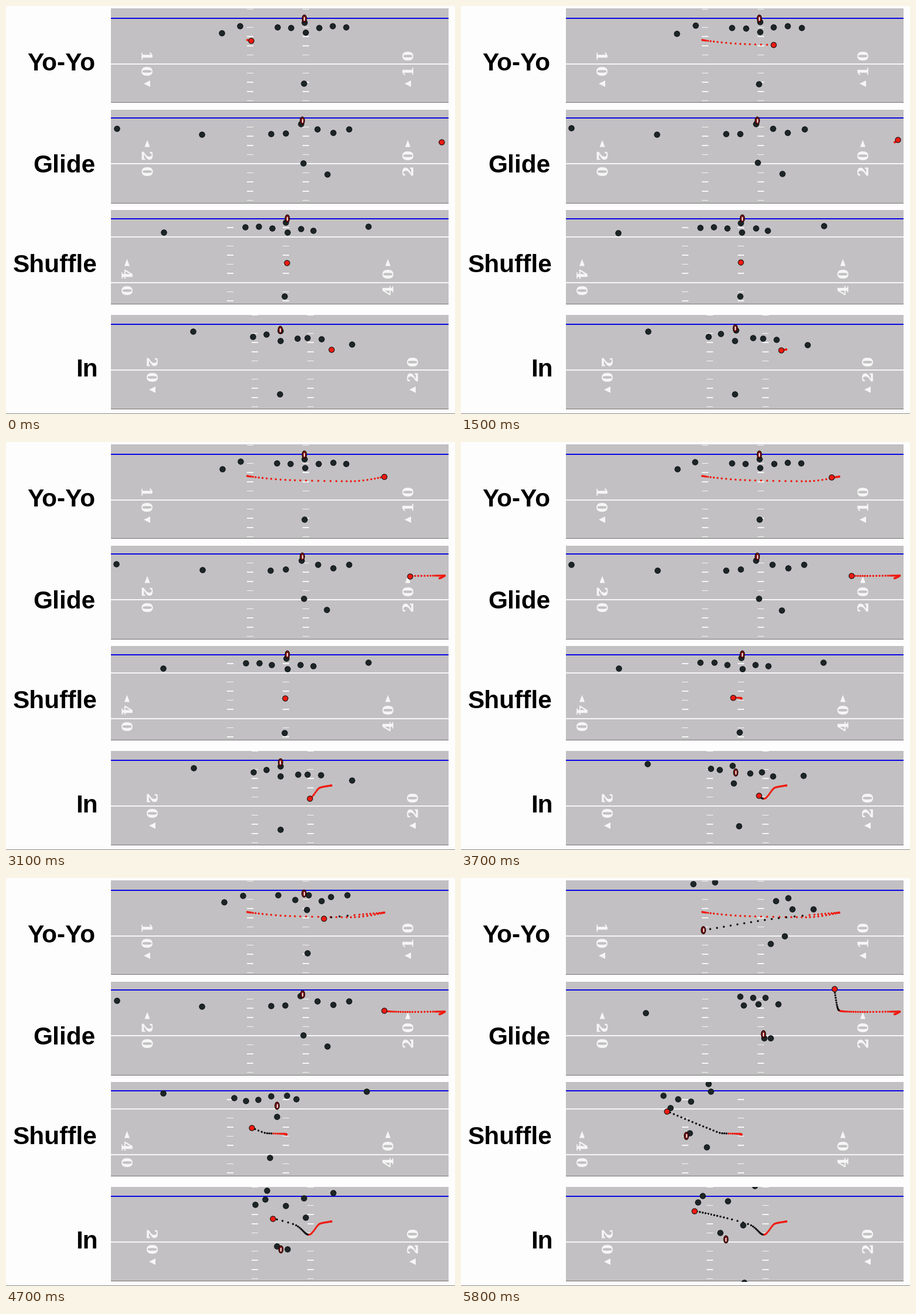
A matplotlib script for the animation above (5.9 s loop, 766 by 696 pixels).

```python
import numpy as np
import matplotlib.pyplot as plt
from matplotlib.animation import FuncAnimation
from matplotlib.patches import Ellipse, PathPatch, Polygon, Rectangle
from matplotlib.textpath import TextPath
from matplotlib.transforms import Affine2D

W, H, DPI = 766, 696, 100
FRAMES, STEP = 59, 100
PRE = 4                      # frames of motion before the loop begins
PX = 72 / DPI                # points per pixel
LEFT, SPAN, DEPTH = 178.5, 576, 160.5
YARD = 15.6
TURF, CHALK, BLUE = "#c2c0c2", "#f6f6f6", "#0c08e6"
DARK, RED, BALL = "#1d2527", "#f01a10", "#7c1717"

T = np.arange(-PRE, FRAMES)
rng = np.random.default_rng(7)


def ease_path(knots):
    """Monotone cubic curve through (time, x, y) knots, sampled at T."""
    knots = np.array(knots, float)
    k, p = knots[:, 0], knots[:, 1:]
    h = np.diff(k)[:, None]
    s = np.diff(p, axis=0) / h
    prod = s[:-1] * s[1:]
    total = np.where(prod > 0, s[:-1] + s[1:], 1)
    m = np.vstack([s[:1], np.where(prod > 0, 2 * prod / total, 0), s[-1:]])
    t = np.clip(T, k[0], k[-1])
    i = np.clip(np.searchsorted(k, t, "right") - 1, 0, len(k) - 2)
    d = h[i]
    u = (t - k[i])[:, None] / d
    return ((1 + 2 * u) * (1 - u) ** 2 * p[i] + u * (1 - u) ** 2 * d * m[i]
            + u * u * (3 - 2 * u) * p[i + 1] + u * u * (u - 1) * d * m[i + 1])


def route(pts, snap):
    """Stand with a slight sway, then run a Bezier route from the snap on."""
    w = np.clip((T - snap) / (FRAMES - 1 - snap), 0, 1)[:, None] ** 1.3
    p = np.reshape(np.array(pts, float), (-1, 1, 2))
    while len(p) > 1:
        p = p[:-1] + (p[1:] - p[:-1]) * w
    sway = 0.6 * np.sin(T[:, None] / 7 + rng.uniform(0, 2 * np.pi, 2))
    return p[0] + sway * (1 - w)


# routes: start, optional control point, end; motion and ball: time, x, y
PLAYS = [
    dict(
        name="Yo-Yo", label=(94.3, 110), top=3.5, blue=20.5, lines=[98.5],
        hashes=(410, 505), number="10", num_x=(240, 685), num_y=(85, 111),
        arrow=("left", 132), snap=44,
        team=[
            (368, 46, 395, 9.5), (399, 33, 432, 6), (461.5, 36, 470, -15),
            (485, 37, 536, 38), (509, 27.5, 557.5, 33.5),
            (509.5, 43.5, 527.5, 111), (533, 36, 564, 52),
            (556.5, 34, 540, 22, 600, 52), (580, 36, 590, -20),
            (508, 132, 551, 98),
        ],
        motion=[(-4, 411, 57.5), (0, 417.5, 58.5), (10, 484, 64.5),
                (21, 588, 66.5), (32, 645, 58.5), (42, 602.5, 62),
                (47, 541.5, 68), (58, 413, 88.5)],
        ball=[(44, 508.5, 21), (47, 508, 26), (51, 499, 74), (58, 413, 88.5)],
    ),
    dict(
        name="Glide", label=(98.7, 283), top=176, blue=190.5, lines=[268.5],
        hashes=(410, 505), number="20", num_x=(240.5, 685), num_y=(255, 282),
        arrow=("up", 234), snap=47,
        team=[
            (187.5, 208, 190, 165), (334, 218.5, 314, 229),
            (451.5, 218, 475, 201), (476, 217, 481, 216),
            (502.5, 201, 497, 203), (506.5, 266.5, 516, 272),
            (547, 286, 527.5, 272), (531, 208.5, 506, 214),
            (557, 215, 518, 203), (585, 209, 540, 214),
        ],
        motion=[(-4, 739, 232), (0, 742, 231), (10, 748, 227.5),
                (21, 734, 227.5), (31, 688.5, 228), (42, 651, 227),
                (47, 644, 225), (58, 636, 188)],
        ball=[(45, 505, 195), (47, 505.5, 198), (51, 511, 262),
              (58, 515.5, 266)],
    ),
    dict(
        name="Shuffle", label=(82.7, 454), top=347.5, blue=362,
        lines=[393.5, 471], hashes=(376, 471), number="40",
        num_x=(206, 651), num_y=(457, 485), arrow=("up", 437), snap=40,
        team=[
            (268, 386, 264, 320), (407.5, 376.5, 344, 370),
            (431, 376, 356, 391), (453.5, 379, 369, 376),
            (477, 368.5, 391, 380), (479, 386, 418, 458),
            (502, 379, 421, 350), (523, 382, 425, 363.5),
            (618, 375, 608, 334), (475, 494.5, 389, 434.5),
        ],
        motion=[(0, 478, 437), (31, 475, 436), (42, 445, 435),
                (47, 418.5, 425.5), (58, 350, 397)],
        ball=[(40, 479.5, 362), (42, 479, 363), (47, 462, 388),
              (53, 430, 450), (58, 384, 439.5)],
    ),
    dict(
        name="In", label=(137.3, 632), top=526.5, blue=542.5, lines=[620],
        hashes=(418, 513), number="20", num_x=(249, 693), num_y=(607, 633),
        arrow=("left", 654), snap=33,
        team=[
            (319, 555, 300, 480), (421, 563, 472, 498), (443.5, 559, 403, 552),
            (467, 570, 450, 632, 482, 689.5), (468, 552.5, 411, 541.5),
            (497, 566, 454, 550), (514, 566, 500, 524),
            (537, 568, 480.5, 591), (590, 577, 520, 490),
            (467, 661, 504, 628, 441, 604),
        ],
        motion=[(10, 554, 585.5), (21, 535.5, 589), (32, 516, 608),
                (42, 494.5, 592), (47, 454, 580), (58, 397, 567)],
        ball=[(10, 467.5, 552), (21, 467.5, 547), (33, 468, 546),
              (47, 468.5, 633), (58, 451.5, 616)],
    ),
]

# whole coordinates are pixel centres
fig = plt.figure(figsize=(W / DPI, H / DPI), dpi=DPI, facecolor="#fdfdfd")
ax = fig.add_axes([0, 0, 1, 1])
ax.set_xlim(-0.5, W - 0.5)
ax.set_ylim(H - 0.5, -0.5)
ax.axis("off")


def box(x, y, w, h, color, z, clip=None):
    r = ax.add_patch(Rectangle((x, y), w, h, fc=color, lw=0, zorder=z))
    if clip is not None:
        r.set_clip_path(clip)
    return r


def digit(ch, x, y, angle):
    path = TextPath((0, 0), ch, size=24.5,
                    prop=dict(family="DejaVu Serif", weight="bold"))
    ext = path.get_extents()
    move = (Affine2D().translate(-(ext.x0 + ext.x1) / 2, -(ext.y0 + ext.y1) / 2)
            .scale(1, -1).rotate_deg(angle).translate(x, y))
    ax.add_patch(PathPatch(move.transform_path(path), fc=CHALK, ec=CHALK,
                           lw=0.5 * PX, zorder=3))


def arrow(kind, x, y):
    if kind == "up":
        pts = [(x, y - 6), (x - 4.5, y + 6), (x + 4.5, y + 6)]
    else:
        pts = [(x - 5.5, y), (x + 5.5, y - 5.5), (x + 5.5, y + 5.5)]
    ax.add_patch(Polygon(pts, fc=CHALK, lw=0, zorder=3))


def dots(size, color, z, clip, edge="none", lw=0):
    d = ax.scatter([], [], s=(size * PX) ** 2, c=color, zorder=z,
                   edgecolors=edge, linewidths=lw * PX)
    d.set_clip_path(clip)
    return d


class Play:
    def __init__(self, spec):
        self.snap = spec["snap"]
        self.draw_field(spec)
        self.team = np.stack([route(r, self.snap) for r in spec["team"]], 1)
        self.motion = ease_path(spec["motion"])
        self.ball = ease_path(spec["ball"])
        self.red_trail = dots(3.4, RED, 5, self.turf)
        self.black_trail = dots(3.4, "#0c0c0c", 6, self.turf)
        self.players = dots(9.4, DARK, 7, self.turf, "#0b1012", 1)
        self.mover = dots(9.2, RED, 8, self.turf, "#1a1010", 1.1)
        self.skin = ax.add_patch(Ellipse((0, 0), 7.6, 12.6, fc=BALL,
                                         ec="#1c0606", lw=1.2 * PX, zorder=9))
        self.lace, = ax.plot([], [], color="white", lw=1.7 * PX, zorder=10,
                             solid_capstyle="butt")

    def draw_field(self, s):
        top = s["top"]
        self.turf = box(LEFT, top, SPAN, DEPTH, TURF, 1)
        box(LEFT, top + DEPTH - 1, SPAN, 1, "#767476", 4)
        for k in range(-1, 10):
            y = s["blue"] + YARD * k
            if k and all(abs(y - line) > 5 for line in s["lines"]):
                for x in s["hashes"]:
                    box(x, y - 0.8, 11.5, 1.6, CHALK, 2, self.turf)
        for y in s["lines"]:
            box(LEFT, y - 1, SPAN, 2, CHALK, 2)
        box(LEFT, s["blue"] - 1, SPAN, 2, BLUE, 4)
        kind, ay = s["arrow"]
        for x, angle, order in zip(s["num_x"], (90, -90), (1, -1)):
            for ch, y in zip(s["number"][::order], s["num_y"]):
                digit(ch, x, y, angle)
            arrow(kind, x, ay)
        ax.text(*s["label"], s["name"], family="Liberation Sans", ha="center",
                weight="bold", size=42.4 * PX, color="black", va="baseline")

    def update(self, f):
        i, s = f + PRE, self.snap + PRE
        x, y = self.ball[i]
        self.players.set_offsets(self.team[i])
        self.red_trail.set_offsets(self.motion[:min(i + 1, s)])
        self.black_trail.set_offsets(self.motion[s:i + 1])
        self.mover.set_offsets(self.motion[i:i + 1])
        # a carried ball stands in for its runner
        self.mover.set_visible(np.hypot(*(self.motion[i] - (x, y))) > 3)
        self.skin.center = x, y
        self.lace.set_data([x, x], [y - 3, y + 3])


plays = [Play(spec) for spec in PLAYS]
box(-0.5, H - 1.5, W, 1, "#8a8a8a", 1)


def draw(f):
    for play in plays:
        play.update(f)
    return []


anim = FuncAnimation(fig, draw, frames=FRAMES, interval=STEP, repeat=True,
                     repeat_delay=0, blit=False)
plt.show()
```
